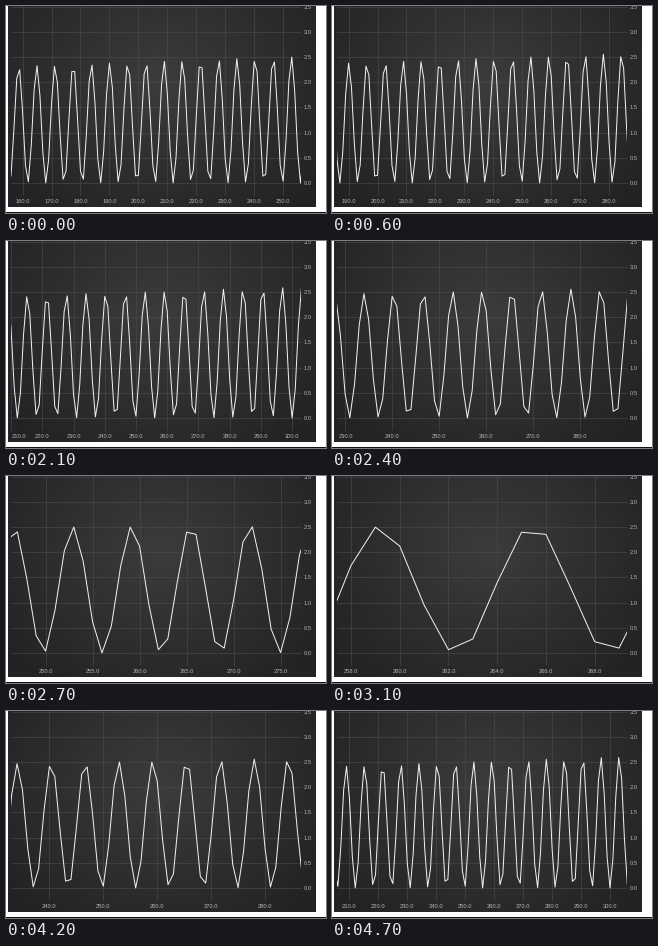
Write a matplotlib script that moves like this. It is 320 px wide and 207 px high and loops after 5.6 s.

```python
import numpy as np
import matplotlib.pyplot as plt
from matplotlib.animation import FuncAnimation
from matplotlib.patches import Rectangle

W, H, DPI = 320, 207, 64           # a power of two keeps the pixel size exact
PX = 72 / DPI                      # points per pixel
LEFT, RIGHT, BOTTOM = 5, 294.5, 189
ZERO_Y, UNIT_Y = 177, 50.4
TICKS, TICK_MS = 56, 100

SPAN, LAST_LEFT, FOCUS = 100, 205.7, 0.587
# log of the magnification along the pinch gesture
PINCH = np.polyfit([1, 7, 11, 15], [0.0758, 1.1777, 2.130, 2.6], 3)

plt.rcParams["font.family"] = "Liberation Sans"
fig = plt.figure(figsize=(W / DPI, H / DPI), dpi=DPI, facecolor="white")
ax = fig.add_axes([0, 0, 1, 1])
ax.set_xlim(0, W)
ax.set_ylim(H, 0)
ax.axis("off")


def to_y(value):
    return ZERO_Y - UNIT_Y * value


def wave(x):
    return (1 + x / 1000) * (1 + np.sin(x))


def draw_panel():
    gx, gy = np.meshgrid(np.arange(W) + 0.5, np.arange(H) + 0.5)
    dist = np.hypot((gx - 155) / 190, (gy - 75) / 165)
    glow = np.clip(1 - dist, 0, 1)[..., None]
    dark, light = np.array([34, 35, 36]), np.array([59, 60, 61])
    shade = (dark + (light - dark) * glow) / 255
    image = ax.imshow(shade, extent=(0, W, H, 0), aspect="auto", zorder=0)
    image.set_clip_path(Rectangle((1.5, -1), 307.5, 202, transform=ax.transData))
    ax.add_patch(Rectangle((0, 205.6), W, 2, color="#101010", lw=0))


def label(x, y, text=""):
    return ax.text(x, y, text, color="#b4b4b4", fontsize=5.7 * PX,
                   ha="center", va="center_baseline", zorder=4)


draw_panel()
for half in range(8):
    y = to_y(half / 2)
    ax.plot([LEFT, RIGHT], [y, y], color="#4a4b4c", lw=0.6 * PX, zorder=1)
    label(301.5, y, f"{half / 2:.1f}")

grid = [ax.plot([], [], color="#4a4b4c", lw=0.6 * PX, zorder=1)[0] for _ in range(14)]
names = [label(0, 195) for _ in grid]
curve, = ax.plot([], [], color="#f0f0f0", lw=1.0 * PX, zorder=3)
curve.set_clip_path(Rectangle((LEFT, 0), RIGHT - LEFT, 200, transform=ax.transData))


def view(i):
    """Left edge and width of the visible range."""
    if i <= 20:
        left = np.interp(i, [0, 1, 3, 4, 5, 6, 8, 9, 10, 11],
                         [156, 166, 166, 168, 176, 186, 186, 188, 196, LAST_LEFT])
        return left, SPAN
    if i < 42:
        width = SPAN * np.exp(-np.polyval(PINCH, min(i - 20, 15)))
    else:
        width = SPAN - 46.3 * (1 - min(i - 42, 5) / 5) ** 2
    return LAST_LEFT + FOCUS * (SPAN - width), width


def tick_step(width):
    for step, least in ((10, 44), (5, 22), (2, 9)):
        if width > least:
            return step
    return 1


def draw(i):
    left, width = view(i)
    scale = (RIGHT - LEFT) / width

    def to_x(value):
        return LEFT + (value - left) * scale

    xs = np.arange(np.floor(left) - 1, np.ceil(left + width) + 2)
    curve.set_data(to_x(xs), to_y(wave(xs)))

    step = tick_step(width)
    first = np.ceil(left / step) * step
    for n, (line, name) in enumerate(zip(grid, names)):
        value = first + n * step
        shown = value <= left + width
        line.set_visible(shown)
        name.set_visible(shown)
        if shown:
            x = to_x(value)
            line.set_data([x, x], [0, BOTTOM])
            name.set_x(np.clip(x, 13.5, 288))
            name.set_text(f"{value:.1f}")
    return [curve, *grid, *names]


anim = FuncAnimation(fig, draw, frames=TICKS, interval=TICK_MS, repeat=True, repeat_delay=0)
plt.show()
```
